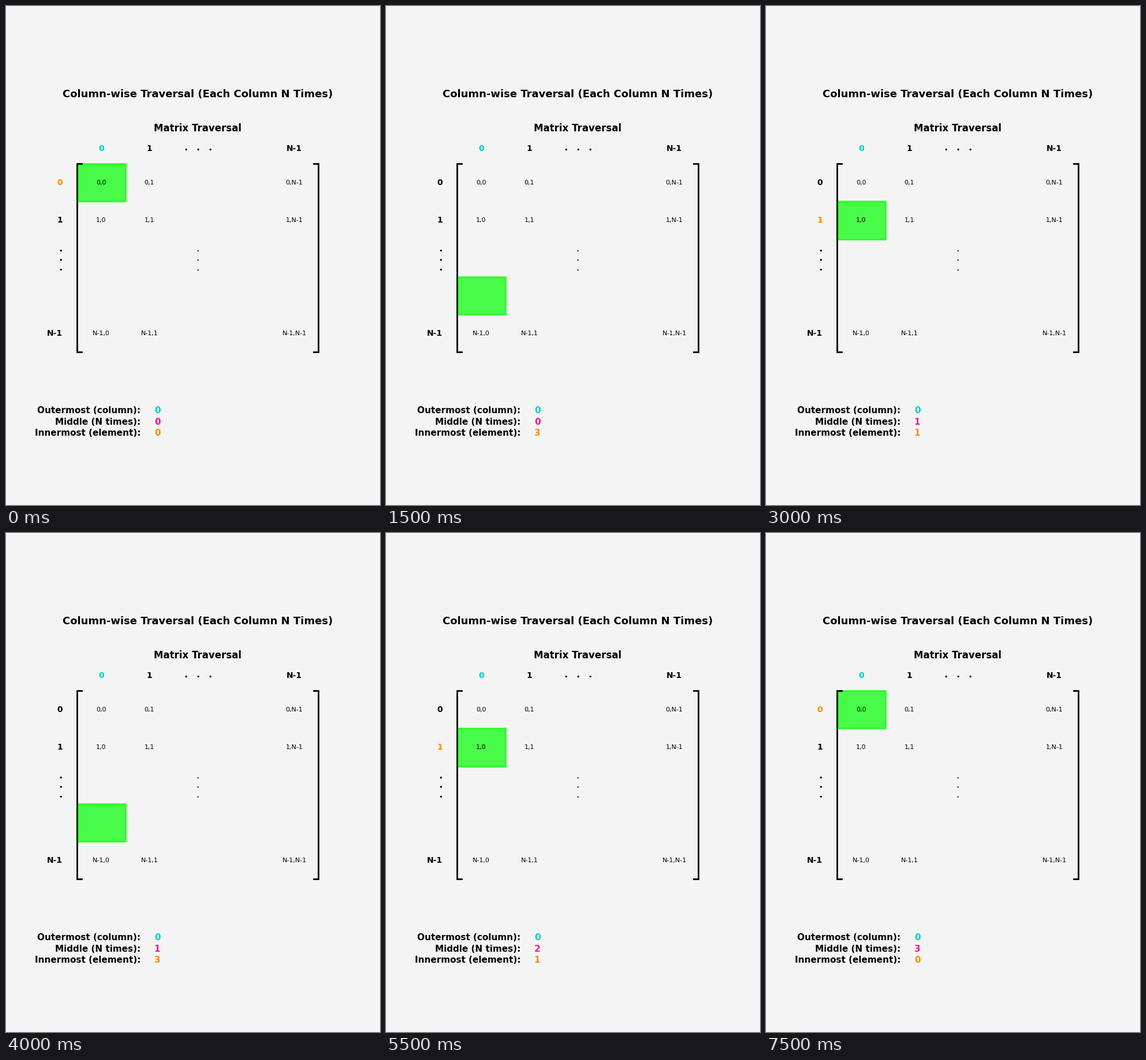
Write a matplotlib script that moves like this. It is 648x864 px and loops after 8 s.

```python
import matplotlib.pyplot as plt
from matplotlib.animation import FuncAnimation
from matplotlib.patches import Rectangle

plt.rcParams["font.family"] = "DejaVu Sans"

BG = "#f4f4f4"
COL_COLOR, MID_COLOR, ROW_COLOR = "darkturquoise", "deeppink", "darkorange"
SIZE = 5
NAMES = {0: "0", 1: "1", 4: "N-1"}  # the other indices are elided
STEP_MS = 500
STEPS = 16

fig = plt.figure(figsize=(6.48, 8.64), dpi=100, facecolor=BG)
ax = fig.add_axes([0.125, 0.11, 0.775, 0.77])
ax.set_xlim(-0.5, SIZE + 0.5)
ax.set_ylim(SIZE + 2.6, -2.6)
ax.axis("off")


def label(x, y, text, size, ha="center", va="center", weight="bold", color="black"):
    return ax.text(x, y, text, fontsize=size, ha=ha, va=va,
                   fontweight=weight, color=color, zorder=5)


def bracket(x, tip):
    ax.plot([x + tip, x, x, x + tip], [0, 0, SIZE, SIZE], color="black", lw=2,
            solid_joinstyle="miter", solid_capstyle="projecting", zorder=3)


label(SIZE / 2, -1.7, "Column-wise Traversal (Each Column N Times)", 13, va="bottom")
label(SIZE / 2, -0.8, "Matrix Traversal", 12, va="bottom")

bracket(0, 0.1)
bracket(SIZE, -0.1)

row_labels = {}
for i, name in NAMES.items():
    label(i + 0.5, -0.3, name, 10, va="bottom",
          color=COL_COLOR if i == 0 else "black")
    row_labels[i] = label(-0.3, i + 0.5, name, 10, ha="right")
    for j, other in NAMES.items():
        label(j + 0.5, i + 0.5, f"{name},{other}", 8, weight="normal")

# Ellipses: column header, row header, matrix body
for d in (-0.25, 0, 0.25):
    label(2.5 + d, -0.3, ".", 12, va="bottom")
    label(-0.3, 2.5 + d, ".", 12, ha="right")
    label(2.5, 2.5 + d, ".", 12, weight="normal")

counters = []
for k, (text, color) in enumerate([("Outermost (column):", COL_COLOR),
                                   ("Middle (N times):", MID_COLOR),
                                   ("Innermost (element):", ROW_COLOR)]):
    y = 6.55 + 0.3 * k
    label(1.32, y, text, 11, ha="right")
    counters.append(label(1.6, y, "0", 11, ha="left", color=color))

cell = ax.add_patch(Rectangle((0, 0), 1, 1, facecolor="lime", edgecolor="lime",
                              lw=2, alpha=0.7, zorder=2))


def update(step):
    middle, row = divmod(step, SIZE)
    cell.set_y(row)
    for i, text in row_labels.items():
        text.set_color(ROW_COLOR if i == row else "black")
    for text, value in zip(counters, (0, middle, row)):
        text.set_text(str(value))
    return [cell, *row_labels.values(), *counters]


anim = FuncAnimation(fig, update, frames=STEPS, interval=STEP_MS,
                     repeat=True, repeat_delay=0)
plt.show()
```
